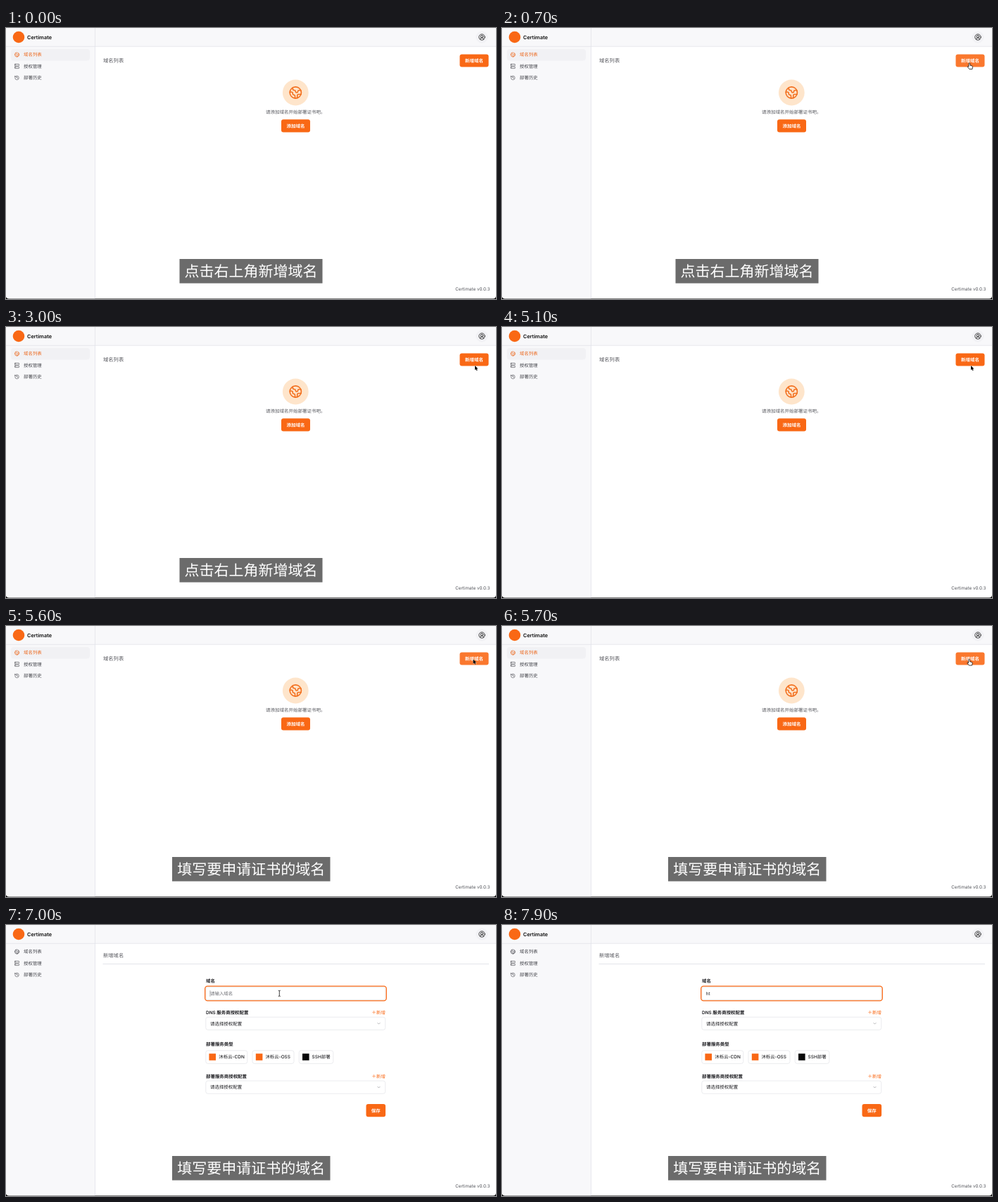
Animation of 696 by 386 pixels, one loop 8 s. Source, as an HTML page:

```html
<!DOCTYPE html>
<html lang="zh-CN">
<head>
<meta charset="utf-8">
<title>域名列表</title>
<style>
html, body { margin: 0; width: 100%; height: 100%; overflow: hidden; background: #000; }
svg { display: block; width: 696px; height: 386px; }
text { font-family: Inter, "Noto Sans CJK SC", "Noto Sans CJK", sans-serif; text-rendering: geometricPrecision; white-space: pre; }
</style>
</head>
<body>
<svg id="stage" viewBox="0 0 696 386" xmlns="http://www.w3.org/2000/svg"></svg>
<script>
const LOOP = 8000, STEP = 100;
const ORANGE = '#f96815', HOVER = '#fa782e', PANEL = '#f8f8fa', LINE = '#e3e4e9';
const INK = '#1c1c20', GREY = '#55565c';

const rect = (x, y, w, h, fill, r = 0, extra = '') =>
  `<rect x="${x}" y="${y}" width="${w}" height="${h}" rx="${r}" fill="${fill}" ${extra}/>`;
const circle = (x, y, r, fill) => `<circle cx="${x}" cy="${y}" r="${r}" fill="${fill}"/>`;

// y is the vertical middle of the line
const text = (x, y, str, size = 6.45, fill = INK, weight = 500, anchor = 'start') =>
  `<text x="${x}" y="${y + size * 0.37}" font-size="${size}" fill="${fill}" font-weight="${weight}" text-anchor="${anchor}">${str}</text>`;
const group = (id, body) => `<g id="${id}">${body}</g>`;

const ring = '<circle cx="12" cy="12" r="10"/>';
const icons = {
  earth: ring + '<path d="M21.54 15H17a2 2 0 0 0-2 2v4.54M7 3.34V5a3 3 0 0 0 3 3a2 2 0 0 1 2 2c0 1.1.9 2 2 2a2 2 0 0 0 2-2c0-1.1.9-2 2-2h3.17M11 21.95V18a2 2 0 0 0-2-2a2 2 0 0 1-2-2v-1a2 2 0 0 0-2-2H2.05"/>',
  server: '<rect x="2" y="2" width="20" height="8" rx="2"/><rect x="2" y="14" width="20" height="8" rx="2"/><path d="M6 6h.01M6 18h.01"/>',
  history: '<path d="M3 12a9 9 0 1 0 9-9 9.75 9.75 0 0 0-6.74 2.74L3 8M3 3v5h5M12 7v5l4 2"/>',
  user: ring + '<path d="M18 20a6 6 0 0 0-12 0"/><circle cx="12" cy="10" r="4"/>',
  plus: '<path d="M4 12h16M12 4v16"/>',
  chevron: '<path d="m6 9 6 6 6-6"/>'
};
const icon = (name, x, y, size, color) =>
  `<g transform="translate(${x - size / 2} ${y - size / 2}) scale(${size / 24})" fill="none" stroke="${color}" stroke-width="2" stroke-linecap="round" stroke-linejoin="round">${icons[name]}</g>`;

const button = (x, y, w, h, label, id = '') =>
  rect(x, y, w, h, ORANGE, 3, id && `id="${id}"`) +
  text(x + w / 2, y + h / 2, label, 6.5, '#fff', 600, 'middle');
const box = (x, y, w, h) => rect(x, y, w, h, '#fff', 3, `stroke="${LINE}" stroke-width=".7"`);
const addLink = y => icon('plus', 522.6, y, 6.2, ORANGE) + text(526, y, '新增', 6.45, ORANGE);
const select = y => box(283.8, y, 255, 18.2) + text(290, y + 9.1, '请选择授权配置') +
  icon('chevron', 529.5, y + 9.1, 6.5, '#77787e');
const card = (x, w, mark, color, label, textX) => box(x, 178.8, w, 18.6) +
  rect(mark, 183.2, 9.6, 9.6, color) + text(textX, 188, label);
const menuItem = (y, name, label, color = '#45464c') =>
  icon(name, 15.5, y, 7.4, color) + text(25, y, label, 6.45, color);
const subtitle = (id, x, w, label) => group(id,
  rect(x, 329, w, 34.6, '#6b6b6b') + text(x + w / 2, 346.3, label, 21, '#fff', 400, 'middle'));

const shell =
  '<path d="M0 0H696V381.5a4 4 0 0 1-4 4H4a4 4 0 0 1-4-4Z" fill="#fff"/>' +
  `<path d="M0 0H696V26H126.5V385.3H4a4 4 0 0 1-4-4Z" fill="${PANEL}"/>` +
  `<path d="M0 26.3H696M126.5 0V385" stroke="${LINE}" stroke-width=".8"/>` +
  circle(18, 13, 8.3, ORANGE) + text(30, 13, 'Certimate', 7.35, '#111', 600) +
  circle(676, 13, 8.6, '#f2f2f5') + icon('user', 676, 13, 10, '#222') +
  menuItem(54.5, 'server', '授权管理') + menuItem(71, 'history', '部署历史') +
  text(687.3, 372, 'Certimate v0.0.3', 6.3, GREY, 400, 'end');

const listPage = group('list',
  rect(7, 30, 112, 16.4, '#f1f1f4', 4) + menuItem(38, 'earth', '域名列表', '#ec691f') +
  text(138, 46.3, '域名列表', 7.3, GREY, 400) + button(644.5, 37.4, 41, 18.2, '新增域名', 'add') +
  circle(411.3, 92, 18.4, '#fee5cb') + icon('earth', 411.3, 92, 19.5, '#f3701f') +
  text(369, 120, '请添加域名开始部署证书吧。', 6.5, GREY, 400) +
  button(391, 130.2, 41, 18.2, '添加域名'));

const formPage = group('form',
  menuItem(38, 'earth', '域名列表') + text(138, 42.8, '新增域名', 7.3, GREY, 400) +
  rect(137.5, 55.1, 548.5, 0.9, '#dfe1e8') +
  text(284, 79.5, '域名', 6.45, INK, 600) + box(283.8, 88.6, 255, 18) +
  rect(282.7, 87.2, 257.6, 20.6, 'none', 3.6, `id="focus" stroke="${ORANGE}" stroke-width="1.3"`) +
  group('hint', text(290, 97.6, '请输入域名', 6.45, '#6d6e74', 400)) +
  `<text id="typed" x="289.8" y="99.9" font-size="6.4" fill="${INK}"></text>` +
  rect(289.6, 93.3, 0.7, 8.6, INK, 0, 'id="caret"') +
  text(284, 124.3, 'DNS 服务商授权配置', 6.45, INK, 600) + addLink(124.3) + select(131.2) +
  text(284, 170, '部署服务类型', 6.45, INK, 600) +
  card(283.8, 59, 288.4, ORANGE, '沐栎云-CDN', 302.3) +
  card(350, 59, 354.8, ORANGE, '沐栎云-OSS', 368.4) +
  card(416.2, 48.6, 421, '#080808', 'SSH部署', 434.6) +
  text(284, 215.3, '部署服务商授权配置', 6.45, INK, 600) + addLink(215.3) + select(222) +
  button(511.5, 255, 27.6, 18.2, '保存'));

const pointer = group('pointer',
  group('arrow', '<path d="M0 0V6.3L1.5 5L2.5 7.2L3.6 6.7L2.6 4.6H4.5Z" fill="#000" stroke="#fff" stroke-width=".6" paint-order="stroke"/>') +
  group('hand', '<path d="M-1 .8a.9.9 0 0 1 1.9 0V3.2l2.6.7q1.2.4 1 1.8L4 8.6H-.2L-2.6 5.6q-.4-1.2.8-.9L-1 5.2Z" fill="#fff" stroke="#111" stroke-width=".8" stroke-linejoin="round"/>') +
  group('beam', '<path d="M-1.5-4.2Q0-4.2 0-3Q0-4.2 1.5-4.2M0-3V3M-1.5 4.2Q0 4.2 0 3Q0 4.2 1.5 4.2" fill="none" stroke="#111" stroke-width=".8"/>'));

document.getElementById('stage').innerHTML = shell + listPage + formPage +
  subtitle('sub1', 246.5, 203, '点击右上角新增域名') +
  subtitle('sub2', 236, 224.5, '填写要申请证书的域名') + pointer;

// time, x, y of the pointer
const path = [
  [100, 411, 348], [700, 664, 50], [800, 664, 50], [1100, 660.3, 53.8],
  [1700, 660.3, 53.8], [2300, 666, 55], [5100, 666, 55], [5500, 663.6, 47.5],
  [5900, 663.6, 47.5], [6400, 388.3, 97.4], [LOOP, 388.3, 97.4]
];
const clamp = v => Math.min(1, Math.max(0, v));

function pointerAt(t) {
  const i = Math.max(1, path.findIndex(p => t < p[0]));
  const [t0, x0, y0] = path[i - 1], [t1, x1, y1] = path[i];
  const u = clamp((t - t0) / (t1 - t0)), e = u * u * (3 - 2 * u);
  return [x0 + (x1 - x0) * e, y0 + (y1 - y0) * e];
}

const el = id => document.getElementById(id);
const show = (id, on) => el(id).setAttribute('visibility', on ? 'visible' : 'hidden');
const between = (t, a, b) => t >= a && t < b;

function draw(time) {
  const t = Math.floor((time % LOOP) / STEP) * STEP;
  const form = t >= 6000;
  el('list').style.display = form ? 'none' : '';
  el('form').style.display = form ? '' : 'none';
  show('sub1', t < 5100);
  show('sub2', t >= 5200);

  const hand = between(t, 700, 2000) || between(t, 5700, 6000);
  const beam = between(t, 6400, 7500);
  show('hand', hand);
  show('beam', beam);
  show('arrow', !hand && between(t, 100, 6400));
  el('pointer').setAttribute('transform', `translate(${pointerAt(t)})`);
  el('add').setAttribute('fill', between(t, 700, 2000) || between(t, 5400, 6000) ? HOVER : ORANGE);

  show('focus', t >= 6600);
  show('hint', t < 7500);
  el('typed').textContent = 'ht'.slice(0, (t >= 7500) + (t >= 7900));
  const caret = between(t, 6600, 7400) ? 1 - clamp((t - 6800) / 400) : +(t === 7400);
  el('caret').setAttribute('opacity', caret);
}

const start = performance.now();
function tick() {
  draw(performance.now() - start);
  requestAnimationFrame(tick);
}
tick();
</script>
</body>
</html>
```
